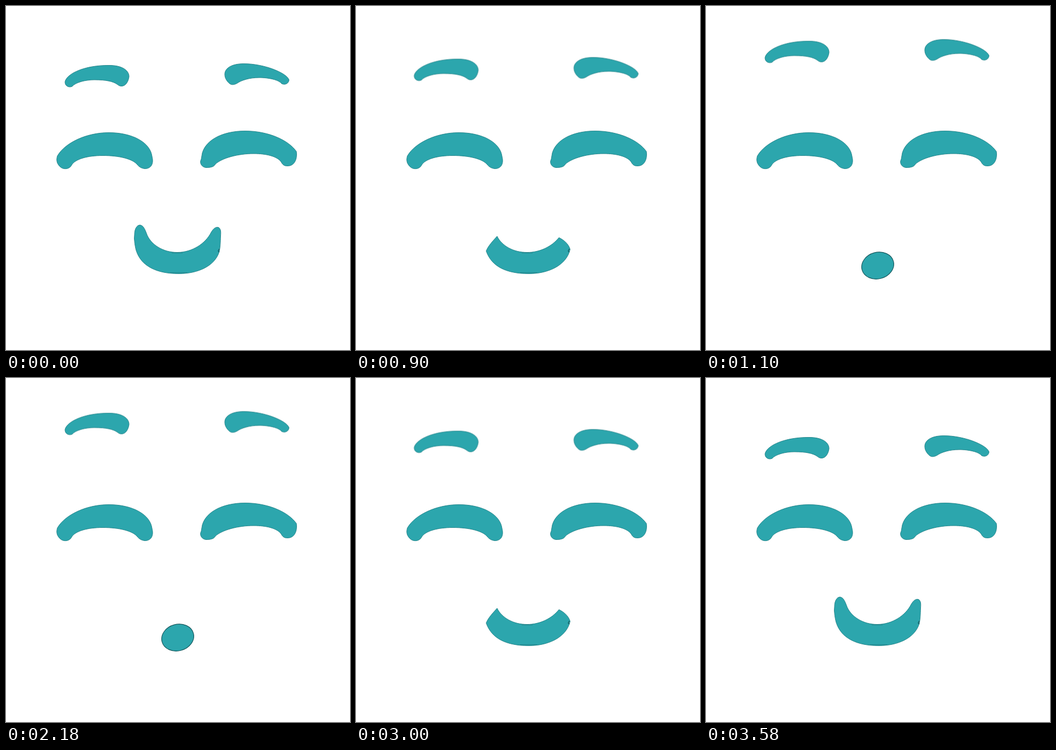
Animation of 629 by 629 pixels, one loop 3900 ms. Source, as an HTML page:

```html
<!DOCTYPE html>
<html lang="en">
<head>
<meta charset="utf-8">
<title>Surprised smile</title>
<style>
  html, body { margin: 0; width: 100%; height: 100%; overflow: hidden; background: #fff; }
  svg { display: block; width: 100%; height: 100%; }
  .face { fill: #2ca6ad; stroke: #1e7f85; stroke-width: .9; stroke-linejoin: round; }
  .brows, .mouth, .crease, .dimple { animation: 3900ms step-end infinite; }
  .brows { animation-name: raise; }
  .mouth { animation-name: purse, outline; }
  .crease { animation-name: crease; fill: none; stroke: #218087; }
  .dimple { animation-name: dimple; fill: none; stroke: #16555a; stroke-width: 1.2; }

  /* Four held poses: smile, half smile, pursed, round; then back again. */
  @keyframes raise {
    0%, 79.487% { transform: none; }
    23.076%, 76.922% { transform: translate(-1.5px, -11.5px); }
    25.64%, 74.358% { transform: translate(-.5px, -28.5px); }
    28.205% { transform: translate(0, -44.3px); }
  }
  @keyframes purse {
    0%, 79.487% { d: path("M235 418C235 408 239 400.5 245 400.5C251 401 254 408 257 416C264 436 287 450.5 313 450.5C341 450.5 365 434 375 414C379 407 384 403 389 405C393 408 393 413 392.5 420C392 432 392 440 390 449C382 476 350 489.5 316 489.5C276 489.5 247 476 238 447C235.5 438 235 430 234.5 425Z"); }
    23.076%, 76.922% { d: path("M258 421C267 439 288 450.5 313 450.5C336 450.5 358 440 371 423.5C379 427 389 435 391.5 445C385 474 352 489.5 316 489.5C276 489.5 248 477 238 448C242 438 250 430 258 421Z"); }
    25.64%, 74.358% { d: path("M284 444.5C302 452 321 452 338 446.5C344 452 352 457 355.5 463C352 470 346 476 345.5 486C324 491 300 491 275 483C271 470 272 457 284 444.5Z"); }
    28.205% { d: path("M285.3 482.3A29.7 24.2 -15 1 1 342.7 466.9A29.7 24.2 -15 1 1 285.3 482.3Z"); }
  }
  @keyframes outline {
    0%, 74.358% { stroke: #1e7f85; stroke-width: .9; }
    28.205% { stroke: #17595e; stroke-width: 1.2; }
  }
  @keyframes crease {
    0%, 74.358% { visibility: visible; }
    28.205% { visibility: hidden; }
  }
  @keyframes dimple {
    0%, 76.922% { visibility: visible; }
    25.64% { visibility: hidden; }
  }
</style>
</head>
<body>
<svg viewBox="0 0 629 629">
  <g class="face">
    <g class="brows">
      <path d="M108 138C112 123 145 108 189 108.500C211 108.500 225 117 225 129C224 138 219 146 212 146.500C208 147 206 145 203 143C196 138 183 135 162 135C144 135 127 140 121 147C115 150 107 146 108 138Z"/>
      <path d="M400 125C400 114 412 105.500 435 105.500C473 105.500 514 123 517.500 135C517 142 510 145 504 142C499 135 480 131 463 131C445 131 430 136 423 141C418 144 413 145 409 142C404 138 400 132 400 125Z"/>
    </g>
    <path d="M94 274C108 250 147 231.500 188 231.500C232 231.500 264 250 267 275C271 290 264 297.500 254 297.500C248 297 243 294 240 290C232 280 208 273.500 177 273.500C149 273.500 126 280 120 291C116 299 104 300 98 293C92 287 92 280 94 274Z"/>
    <path d="M358 274C361 247 394 228.500 437 228.500C481 228.500 517 246 531 266C533 279 528 292.500 515 292.500C508 293 505 289 503 285C496 275 476 270 453 270C424 270 395 278 383 289C380 295 372 295.500 366 295.500C358 295 353 287 357 280Z"/>
    <path class="mouth"/>
    <path class="crease" d="M303 451.500H323M300 487.500H331"/>
    <path class="dimple" d="M390 444L388 448L390 450"/>
  </g>
</svg>
</body>
</html>
```
